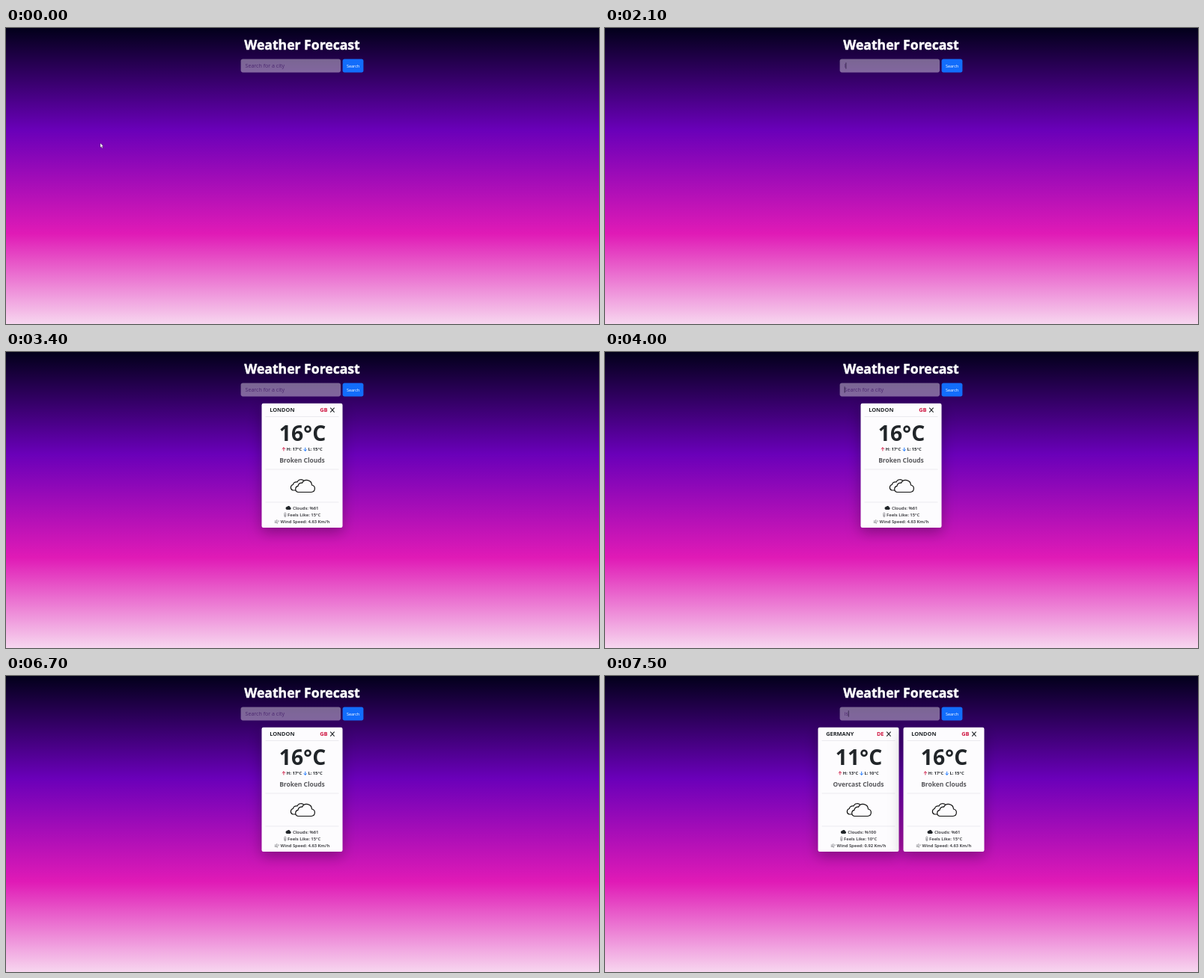
These frames come from a looping animation (792 px wide and 396 px high, 8 s). An HTML page with a canvas:

```html
<!DOCTYPE html>
<html lang="en">
<head>
<meta charset="utf-8">
<title>Weather Forecast</title>
<style>
html, body { margin: 0; width: 100%; height: 100%; overflow: hidden; background: #02001a; }
canvas { display: block; width: 792px; height: 396px; }
</style>
</head>
<body>
<canvas id="stage"></canvas>
<script>
const W = 792, H = 396, LOOP = 8000;
const canvas = document.getElementById('stage');
const ctx = canvas.getContext('2d');
const dpr = window.devicePixelRatio || 1;
canvas.width = W * dpr;
canvas.height = H * dpr;

const FAMILY = '"Open Sans", "Noto Sans", sans-serif';
const INK = '#212529', MUTED = '#4c4c50', RED = '#cf1440', BLUE = '#0d6efd';

// Field contents from each time on
const typed = [
  [0, ''], [2100, 'l'], [2200, 'lon'], [2400, 'lond'], [2700, 'londo'], [2900, 'london'],
  [3000, ''], [5100, 'g'], [5200, 'ge'], [5400, 'ger'], [5600, 'germ'], [5700, 'germa'],
  [5800, 'german'], [6100, 'germany'], [6600, ''], [7300, 'i'], [7500, 'is']
];
// Caret toggles, starting hidden
const blinks = [800, 1300, 1800, 3200, 3700, 4300, 4800, 6700, 7200];

const london = { name: 'LONDON', code: 'GB', temp: 16, high: 17, low: 15, sky: 'Broken Clouds', clouds: 61, feels: 15, wind: '4.63' };
const germany = { name: 'GERMANY', code: 'DE', temp: 11, high: 13, low: 10, sky: 'Overcast Clouds', clouds: 100, feels: 10, wind: '0.92' };

const frontCloud = new Path2D('M-5.5 187.5H12.3A4.8 4.8 0 0 0 13 178A6.9 6.9 0 0 0 0 175.2A4.6 4.6 0 0 0-5.5 179.3A4.2 4.2 0 0 0-5.5 187.5Z');
const backCloud = new Path2D('M-8 185H-12.4A3.9 3.9 0 0 1-12.2 177.5A4.4 4.4 0 0 1-6.6 174A5.6 5.6 0 0 1 3 173L2 182Z');
const miniCloud = new Path2D('M1.8 0H5.5A1.8 1.8 0 0 0 6-3.4A2.3 2.3 0 0 0 1.8-4A2 2 0 0 0 1.8 0Z');
const arrow = new Path2D('M0 0L0 5.8L1.3 4.7L2.2 6.8L3.2 6.4L2.3 4.3L4 4.2Z');

function setFont(size, weight) {
  ctx.font = `${weight} ${size}px ${FAMILY}`;
}

function text(str, x, y, size, color, weight = 700, align = 'left') {
  setFont(size, weight);
  ctx.fillStyle = color;
  ctx.textAlign = align;
  ctx.fillText(str, x, y);
}

function widthOf(str, size, weight) {
  setFont(size, weight);
  return ctx.measureText(str).width;
}

function box(x, y, w, h, r, color) {
  ctx.fillStyle = color;
  ctx.beginPath();
  ctx.roundRect(x, y, w, h, r);
  ctx.fill();
}

function lines(color, width, ...paths) {
  ctx.strokeStyle = color;
  ctx.lineWidth = width;
  ctx.beginPath();
  for (const [start, ...rest] of paths) {
    ctx.moveTo(...start);
    for (const p of rest) ctx.lineTo(...p);
  }
  ctx.stroke();
}

function at(x, y, draw) {
  ctx.save();
  ctx.translate(x, y);
  draw();
  ctx.restore();
}

const icons = {
  up() { lines(RED, 0.9, [[2.5, 0], [2.5, -4.6]], [[0.4, -2.5], [2.5, -4.6], [4.6, -2.5]]); },
  down() { lines(BLUE, 0.9, [[2.5, -4.6], [2.5, 0]], [[0.4, -2.1], [2.5, 0], [4.6, -2.1]]); },
  cloud() { ctx.fillStyle = INK; ctx.fill(miniCloud); },
  thermo() {
    ctx.strokeStyle = '#85858a';
    ctx.lineWidth = 0.7;
    ctx.beginPath();
    ctx.roundRect(0.9, -5, 2.1, 5.6, 1);
    ctx.stroke();
    lines('#77777c', 0.8, [[1.95, -2.8], [1.95, 0]]);
  },
  wind() {
    lines('#85858a', 0.7, [[0, -3], [3, -3], [3.4, -4.2], [2.6, -4.6]],
      [[0, -1.8], [5, -1.8], [5.8, -3.1], [4.7, -3.7]], [[0, -0.6], [3.5, -0.6], [3.9, 0.4], [3, 0.7]]);
  }
};

// Centred row of [icon, icon width, gap, label, trailing gap] groups
function iconRow(cx, y, color, ...groups) {
  const size = 5.8;
  const total = groups.reduce((sum, [, w, gap, label, tail = 0]) => sum + w + gap + widthOf(label, size, 700) + tail, 0);
  let x = cx - total / 2;
  for (const [icon, w, gap, label, tail = 0] of groups) {
    at(x, y, icons[icon]);
    x += w + gap;
    text(label, x, y, size, color);
    x += widthOf(label, size, 700) + tail;
  }
}

function card(cx, d) {
  ctx.save();
  ctx.shadowColor = 'rgba(0,0,0,.3)';
  ctx.shadowBlur = 18 * dpr;
  ctx.shadowOffsetY = 6 * dpr;
  box(cx - 54, 68.7, 108, 166.3, 2.2, '#fdfcfe');
  ctx.restore();

  text(d.name, cx - 43.3, 80.3, 7.4, INK);
  text(d.code, cx + 34, 80.3, 7.4, RED, 700, 'right');
  lines(INK, 1.1, [[cx + 37.7, 74.6], [cx + 43.1, 80.6]], [[cx + 43.1, 74.6], [cx + 37.7, 80.6]]);
  for (const y of [86.5, 157, 201]) lines('#e4e3e8', 0.7, [[cx - 49, y], [cx + 49, y]]);

  text(`${d.temp}°C`, cx + 0.5, 119.4, 28.3, INK, 700, 'center');
  iconRow(cx, 132.4, INK, ['up', 5, 1.4, `H: ${d.high}°C`, 2], ['down', 5, 1.2, `L: ${d.low}°C`]);
  text(d.sky, cx, 147.6, 8.45, '#58585c', 700, 'center');

  at(cx, 0, () => {
    ctx.strokeStyle = '#111';
    ctx.lineWidth = 1.2;
    for (const shape of [backCloud, frontCloud]) {
      ctx.fillStyle = '#fdfcfe';
      ctx.fill(shape);
      ctx.stroke(shape);
    }
  });

  iconRow(cx, 211.1, MUTED, ['cloud', 7.6, 1.6, `Clouds: %${d.clouds}`]);
  iconRow(cx, 220, MUTED, ['thermo', 4, 1.2, `Feels Like: ${d.feels}°C`]);
  iconRow(cx, 229, MUTED, ['wind', 6, 1.8, `Wind Speed: ${d.wind} Km/h`]);
}

function background() {
  const g = ctx.createLinearGradient(0, 0, 0, H);
  g.addColorStop(0, '#02001a');
  g.addColorStop(137 / H, '#6a00b9');
  g.addColorStop(275 / H, '#e01ab6');
  g.addColorStop(1, '#f7d6ef');
  ctx.fillStyle = g;
  ctx.fillRect(0, 0, W, H);
}

function header() {
  text('Weather Forecast', 395.5, 29.4, 17.6, '#fff', 700, 'center');
  ctx.strokeStyle = '#fff';
  ctx.lineWidth = 0.45;
  ctx.strokeText('Weather Forecast', 395.5, 29.4);
  box(449.6, 41.6, 27.8, 17.8, 2.6, '#126dfb');
  text('Search', 463.6, 52.6, 5.5, '#fff', 400, 'center');
}

function field(t) {
  box(313.6, 41.6, 133.4, 17.8, 2.8, 'rgba(255,255,255,.4)');
  const value = typed.filter(([start]) => start <= t).pop()[1];
  text(value || 'Search for a city', 319.6, 53, 7.07, '#4c2870', 400);
  const caretOn = blinks.filter(b => b <= t).length % 2 === 1;
  if (caretOn) {
    const x = 320.1 + widthOf(value, 7.07, 400);
    lines('#2a1a40', 0.8, [[x, 46.3], [x, 54.6]]);
  }
}

function pointer(t) {
  if (t >= 800) return;
  const p = Math.max(0, Math.floor(t / 100) * 100) / 800;
  const e = p * p * (3 - 2 * p);
  at(126 + 230 * e, 154 - 102 * e, () => {
    ctx.fillStyle = '#fff';
    ctx.fill(arrow);
    ctx.strokeStyle = 'rgba(0,0,0,.6)';
    ctx.lineWidth = 0.4;
    ctx.stroke(arrow);
  });
}

function draw(now) {
  const t = now % LOOP;
  ctx.setTransform(dpr, 0, 0, dpr, 0, 0);
  background();
  header();
  field(t);
  if (t >= 6800) {
    card(338.5, germany);
    card(452.5, london);
  } else if (t >= 3400) {
    card(395.5, london);
  }
  pointer(t);
}

const begin = performance.now();
function tick() {
  draw(performance.now() - begin);
  requestAnimationFrame(tick);
}
tick();
</script>
</body>
</html>
```
